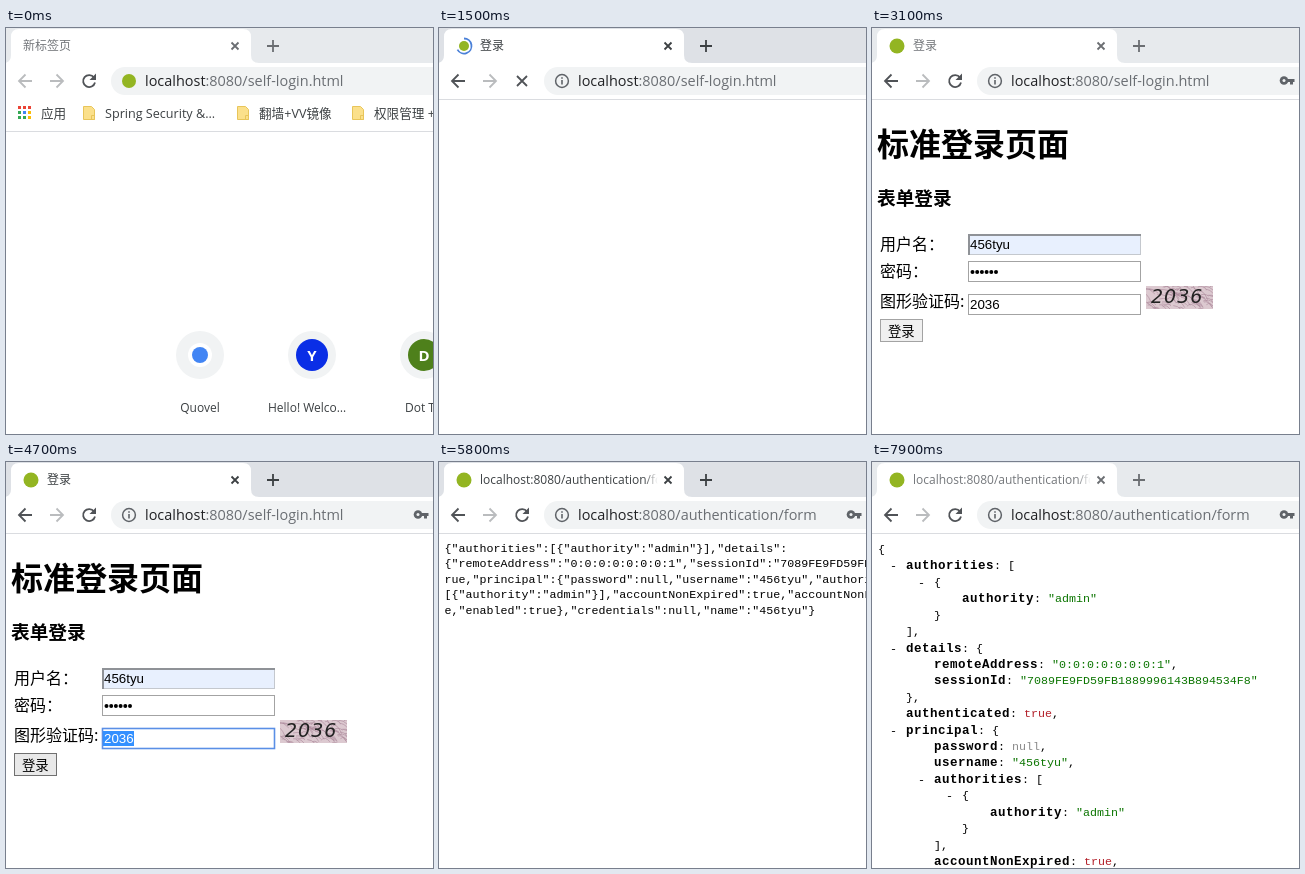
Animation, 427 px wide and 406 px high, one loop 8 s. Source, as an HTML page:

```html
<!DOCTYPE html>
<html lang="zh-CN">
<head>
<meta charset="utf-8">
<style>
  html, body { margin: 0; width: 100%; height: 100%; overflow: hidden; background: #fff; }
  svg { display: block; }
  text { white-space: pre; font-family: "Open Sans", "Noto Sans CJK SC", "Noto Sans CJK", sans-serif; fill: #000; }
  .url { font-size: 14.45px; fill: #6a6e73; }
  .url tspan { fill: #202124; }
  .tab { font-size: 12px; fill: inherit; }
  .mark { font-size: 12.6px; fill: #3c4043; }
  .tile { font-size: 12px; font-weight: 500; fill: #3c4043; }
  .letter { font: bold 15px "Open Sans", sans-serif; fill: #fff; text-anchor: middle; }
  .page text { font-family: "Noto Sans CJK SC", "Noto Sans CJK", sans-serif; font-size: 16px; }
  .page .h1 { font-size: 32px; font-weight: bold; }
  .page .h3 { font-size: 18.7px; font-weight: bold; }
  .page .field { font: 13.33px "Liberation Sans", sans-serif; }
  .page .button { font-size: 13.33px; }
  .page .code { font: italic 19px "DejaVu Sans", sans-serif; font-weight: 200; letter-spacing: 1px; fill: #222; }
  .json text { font: 11.667px "Liberation Mono", monospace; }
  .json .key { font-size: 12.5px; font-weight: bold; letter-spacing: .5px; }
  .json .string { fill: #0b7500; }
  .json .true { fill: #b3202a; }
  .json .null { fill: #8a8a8a; }
  .line { fill: none; stroke-width: 1.8; }
</style>
</head>
<body>
<svg width="427" height="406" viewBox="0 0 427 406">
  <defs>
    <linearGradient id="fade">
      <stop offset=".2" stop-color="#fff" stop-opacity="0"/>
      <stop offset=".75" stop-color="#fff"/>
    </linearGradient>
    <clipPath id="codeClip"><rect x="274" y="258" width="67" height="23"/></clipPath>
  </defs>
  <rect width="427" height="406" fill="#fff"/>

  <!-- Tab strip -->
  <rect id="strip" width="427" height="35"/>
  <path d="M-3 35Q5 35 5 27V9Q5 1 13 1H237Q245 1 245 9V27Q245 35 253 35Z" fill="#fff"/>
  <g id="tabInk">
    <text id="title" class="tab" y="22"></text>
    <rect x="200" y="8" width="25" height="22" fill="url(#fade)"/>
    <rect x="224" y="8" width="20" height="22" fill="#fff"/>
    <path class="line" d="M225.5 14.5l7 7m0-7l-7 7M261 18h12m-6-6v12"/>
  </g>
  <circle id="icon" cx="25" cy="18" fill="#93b522"/>
  <path id="spinner" class="line" stroke-width="2"/>

  <!-- Toolbar -->
  <path id="back" class="line" d="M26 53H13m6.5-6.5L13 53l6.5 6.5"/>
  <path class="line" stroke="#babcbe" d="M44 53h13m-6.5-6.5L57 53l-6.5 6.5"/>
  <g id="reload">
    <path class="line" stroke="#505357" d="M88 49.5A6 6 0 1 0 89 54.5"/>
    <path fill="#505357" d="M90 45.5V52H83.5Z"/>
  </g>
  <path id="stop" class="line" stroke="#505357" d="M78 48l10 10m0-10l-10 10"/>
  <rect id="omnibox" x="105" y="39" width="360" height="28" rx="14" stroke-width="2"/>
  <circle id="typedIcon" cx="123" cy="53" r="7" fill="#93b522"/>
  <g id="info" fill="#5f6368">
    <circle class="line" cx="123" cy="53" r="6.4" stroke="#5f6368" style="stroke-width:1.5"/>
    <path d="M122.2 52h1.6v4.5h-1.6zM122.2 49.2h1.6v1.6h-1.6z"/>
  </g>
  <text class="url" x="139" y="58"><tspan>localhost</tspan><tspan id="path" style="fill:inherit"></tspan></text>
  <g id="passwordKey" fill="#5f6368">
    <circle cx="412" cy="52.5" r="4.3"/><circle cx="412" cy="52.5" r="1.5" fill="#f1f3f4"/>
    <path d="M415 51h7.5v3H421v2.5h-3V54h-3z"/>
  </g>
  <path id="edge" d="M0 71.5H427" stroke="#dadce0"/>

  <g id="newTab">
    <g id="apps"></g>
    <text class="mark" x="35" y="90">应用</text>
    <text class="mark" x="99" y="90">Spring Security &amp;...</text>
    <text class="mark" x="253" y="90">翻墙+VV镜像</text>
    <text class="mark" x="368" y="90">权限管理 +</text>
    <g id="folders" fill="#fbe08b" stroke="#e8c55a"></g>
    <path d="M0 103.5H427" stroke="#dadce0"/>
    <g fill="#f1f3f4"><circle cx="194" cy="327" r="24"/><circle cx="306" cy="327" r="24"/><circle cx="418" cy="327" r="24"/></g>
    <circle cx="194" cy="327" r="12" fill="#fff"/><circle cx="194" cy="327" r="8" fill="#4285f4"/>
    <circle cx="306" cy="327" r="16" fill="#0a2ee6"/><text class="letter" x="306" y="332.5">Y</text>
    <circle cx="418" cy="327" r="16" fill="#4e801b"/><text class="letter" x="418" y="332.5">D</text>
    <text class="tile" x="194" y="384" text-anchor="middle">Quovel</text>
    <text class="tile" x="262" y="384">Hello! Welco…</text>
    <text class="tile" x="399" y="384">Dot Trail</text>
  </g>

  <g id="login" class="page">
    <text class="h1" x="5" y="128">标准登录页面</text>
    <text class="h3" x="5" y="177">表单登录</text>
    <text x="8" y="222">用户名：</text>
    <text x="8" y="249">密码：</text>
    <text x="8" y="279">图形验证码:</text>
    <rect x="96.5" y="206.5" width="172" height="20" fill="#e8f0fe" stroke="#c4c8ce"/>
    <path d="M97 227V207H269" fill="none" stroke="#8f9297" stroke-width="2"/>
    <text class="field" x="98" y="221">456tyu</text>
    <rect x="96.5" y="233.5" width="172" height="20" fill="#fff" stroke="#a3a3a3"/>
    <path d="M100.5 244H126" stroke="#000" stroke-width="4" stroke-linecap="round" stroke-dasharray="0 4.7"/>
    <rect id="codeBox" x="96.5" y="266.5" width="172" height="20" fill="#fff"/>
    <rect id="selection" x="97" y="269" width="31" height="15" fill="#3390ff"/>
    <text id="codeValue" class="field" x="98" y="281">2036</text>
    <g clip-path="url(#codeClip)">
      <rect x="274" y="258" width="67" height="23" fill="#dcc9d0"/>
      <path id="noise" fill="none" stroke="#a98799" stroke-width=".6"/>
      <text class="code" x="279" y="275">2036</text>
    </g>
    <rect id="button" x="8.5" y="291.5" width="42" height="22" fill="#efefef"/>
    <text class="button" x="16" y="308">登录</text>
  </g>

  <g id="raw" class="json"></g>
  <g id="tree" class="json"></g>
  <g id="pretty" class="json"></g>
</svg>
<script>
const LOOP = 8000;
const $ = id => document.getElementById(id);
const set = (id, attrs) => { for (const k in attrs) $(id).setAttribute(k, attrs[k]); };
const show = (id, on) => { $(id).style.display = on ? '' : 'none'; };
const within = (t, from, to) => t >= from && t < to;

const SESSION = '"7089FE9FD59FB1889996143B894534F8"';
const ADDRESS = '"0:0:0:0:0:0:0:1"';
const USER = '"456tyu"';

// *word* is a bold key; strings and literals get their own colours.
const rich = s => s.replace(/\*(\w+)\*|("[^"]*")|(true|null)/g, (all, key, string, literal) =>
  `<tspan class="${key ? 'key' : string ? 'string' : literal}">${key || all}</tspan>`);
const text = (x, y, s) => `<text x="${x}" y="${y}">${s}</text>`;

$('apps').innerHTML = ['#ea4335', '#ea4335', '#ea4335', '#34a853', '#4285f4', '#fbbc05', '#34a853', '#34a853', '#fbbc05']
  .map((c, i) => `<rect x="${12 + i % 3 * 5}" y="${78 + Math.floor(i / 3) * 5}" width="3" height="3" fill="${c}"/>`).join('');
$('folders').innerHTML = [77, 231, 346]
  .map(x => `<path d="M${x + .5} 78.5h8l3 3v10h-11zM${x + 8.5} 87.5h3v4h-3z"/>`).join('');

const random = i => { const v = Math.sin(i * 127.1) * 43758.5; return v - Math.floor(v); };
$('noise').setAttribute('d', Array.from({ length: 75 }, (_, i) =>
  `M${270 + random(i) * 70} ${256 + random(i + 99) * 25}q4 ${random(i + 200) * 6 - 5} 9 ${random(i + 300) * 8}`).join(''));

$('raw').innerHTML = [
  '{"authorities":[{"authority":"admin"}],"details":',
  `{"remoteAddress":${ADDRESS},"sessionId":${SESSION}`,
  `rue,"principal":{"password":null,"username":${USER},"authorities":`,
  '[{"authority":"admin"}],"accountNonExpired":true,"accountNonLocked"',
  `e,"enabled":true},"credentials":null,"name":${USER}}`
].map((s, i) => text(5.5, 90 + i * 15.4, s)).join('');

const bullets = {
  disc: (x, y) => `<circle cx="${x - 14}" cy="${y}" r="2.6"/>`,
  ring: (x, y) => `<circle cx="${x - 14}" cy="${y}" r="2.4" fill="none" stroke="#000"/>`,
  square: (x, y) => `<rect x="${x - 17}" y="${y - 2}" width="5" height="5"/>`
};
$('tree').innerHTML = [
  [10, 87, '-'], [6, 102, '{ ⋯'],
  [74, 132, '*authorities*:', 'disc'], [78, 146, '-'], [74, 161, '[ ⋯'],
  [146, 178, '-', 'ring'], [141, 192, '{ ⋯'],
  [210, 209, '*authority*: "admin"', 'square'], [140, 225, '}'], [73, 240, '],'],
  [74, 258, '*details*:', 'disc'], [78, 271, '-'], [74, 286, '{ ⋯'],
  [142, 303, `*remoteAddress*: ${ADDRESS},`, 'ring'],
  [142, 321, `*sessionId*: ${SESSION}`, 'ring'], [73, 337, '},'],
  [74, 354, '*authenticated*: true,', 'disc'],
  [74, 371, '*principal*:', 'disc'], [78, 385, '-'], [74, 400, '{ ⋯']
].map(([x, y, s, bullet]) => text(x, y + 4, rich(s)) +
  (bullet ? bullets[bullet](s === '-' ? 141 : x, y + 1) : '')).join('');

// Each indent is 28 px; a leading dash is the fold control.
$('pretty').innerHTML = [
  [0, '{'], [1, '-*authorities*: ['], [2, '-{'], [3, '*authority*: "admin"'], [2, '}'], [1, '],'],
  [1, '-*details*: {'], [2, `*remoteAddress*: ${ADDRESS},`], [2, `*sessionId*: ${SESSION}`], [1, '},'],
  [1, '*authenticated*: true,'], [1, '-*principal*: {'], [2, '*password*: null,'], [2, `*username*: ${USER},`],
  [2, '-*authorities*: ['], [3, '-{'], [4, '*authority*: "admin"'], [3, '}'], [2, '],'],
  [2, '*accountNonExpired*: true,']
].map(([level, s], i) => {
  const x = 6 + level * 28, y = 91 + i * 16.42, fold = s[0] === '-';
  return (fold ? text(x - 16, y, '-') : '') + text(x, y, rich(fold ? s.slice(1) : s));
}).join('');

function spinnerPath(start, sweep) {
  const point = a => `${25 + 7.5 * Math.cos(a)} ${18 + 7.5 * Math.sin(a)}`;
  return `M${point(start)}A7.5 7.5 0 ${sweep > Math.PI ? 1 : 0} 1 ${point(start + sweep)}`;
}

function draw(t) {
  const active = within(t, 500, 3100) || within(t, 3900, 7900);
  const waiting = within(t, 900, 1300) || within(t, 4800, 5600);
  const loading = within(t, 900, 1700) || within(t, 4800, 5700);
  const newTab = t < 1300, result = t >= 5600;
  const editing = within(t, 500, 900), selected = t >= 4000;

  set('strip', { fill: active ? '#dee1e6' : '#e7eaed' });
  set('tabInk', { fill: active ? '#3c4043' : '#74777b', stroke: 'none' });
  $('tabInk').lastElementChild.setAttribute('stroke', active ? '#3c4043' : '#6b6e72');
  $('title').textContent = newTab ? '新标签页' : result ? 'localhost:8080/authentication/fo' : '登录';
  set('title', { x: t < 900 ? 17 : 41 });

  show('icon', t >= 1300);
  set('icon', { r: loading ? 5 : 7.5 });
  show('spinner', loading);
  const turn = (Math.floor(t / 100) * 100 - 1500) / 1568 * 2 * Math.PI;
  set('spinner', waiting
    ? { d: spinnerPath(-Math.PI / 2 - turn, 2), stroke: '#8a8d91' }
    : { d: spinnerPath(-Math.PI / 2 + turn, 4.2), stroke: '#4a80d8' });

  set('back', { stroke: newTab ? '#babcbe' : '#505357' });
  show('reload', !loading);
  show('stop', loading);
  set('omnibox', { fill: editing ? '#fff' : '#f1f3f4', stroke: editing ? '#1a73e8' : 'none' });
  show('typedIcon', newTab);
  show('info', !newTab);
  $('path').textContent = result ? ':8080/authentication/form' : ':8080/self-login.html';
  show('passwordKey', t >= 3000);
  show('edge', !newTab);

  show('newTab', newTab);
  show('login', within(t, 1600, 5600));
  show('codeValue', t >= 3000);
  show('selection', selected);
  $('codeValue').style.fill = selected ? '#fff' : '#000';
  set('codeBox', { stroke: selected ? '#5a8fe6' : '#a3a3a3', 'stroke-width': selected ? 1.6 : 1 });
  set('button', { stroke: t >= 4700 ? '#707070' : '#a3a3a3', fill: t >= 4700 ? '#e9e9e9' : '#f0f0f0' });

  show('raw', within(t, 5700, 7400));
  show('tree', within(t, 7400, 7500));
  show('pretty', t >= 7500);
}

const begin = performance.now();
function tick() {
  draw((performance.now() - begin) % LOOP);
  requestAnimationFrame(tick);
}
tick();
</script>
</body>
</html>
```
